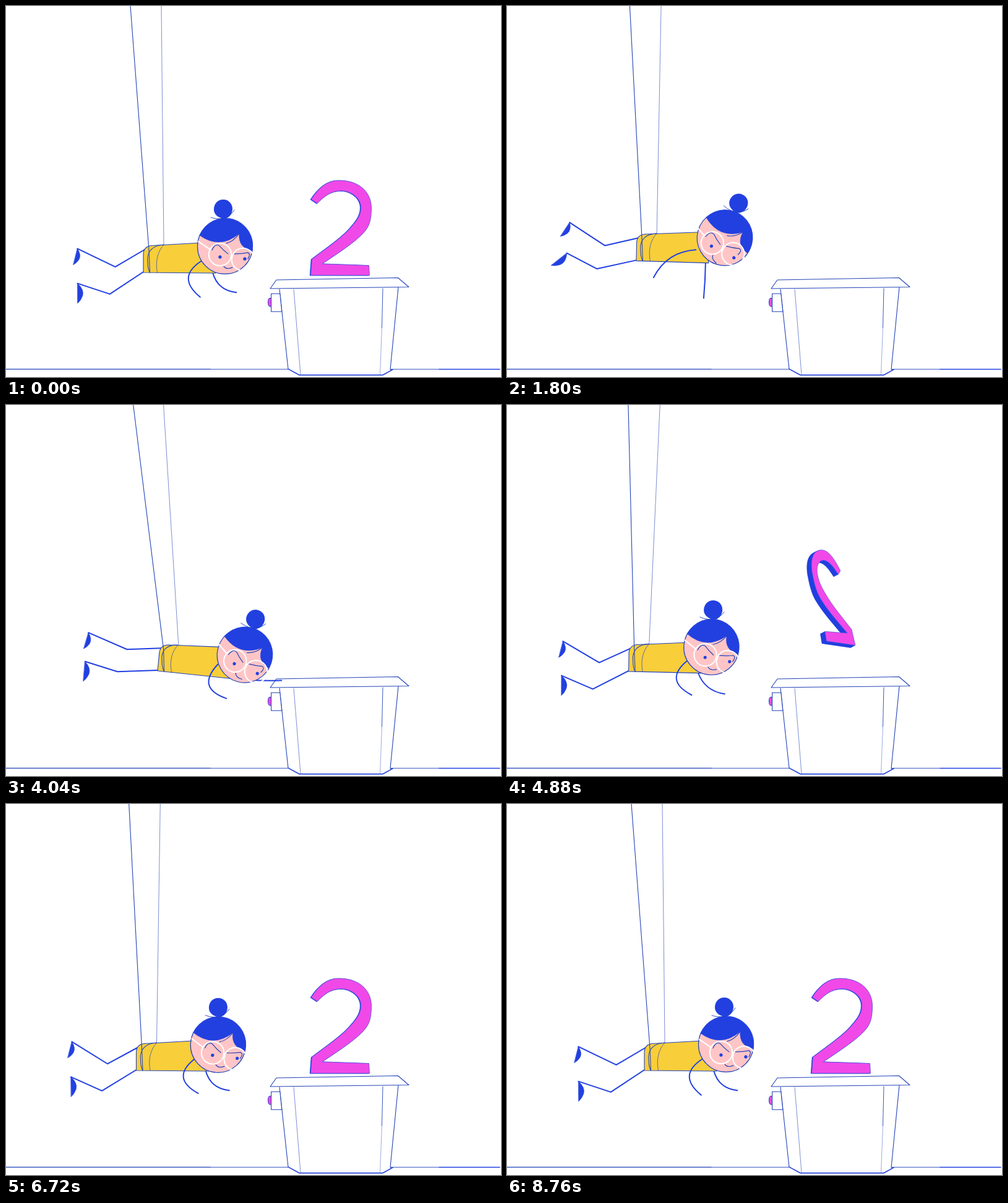
An HTML page with a canvas for the animation above (8.8 s loop, 800x600 px).

```html
<!DOCTYPE html>
<html lang="en">
<head>
<meta charset="utf-8">
<title>Swing and number</title>
<style>
html, body { margin: 0; width: 100%; height: 100%; overflow: hidden; background: #fff; }
canvas { display: block; }
</style>
</head>
<body>
<canvas id="stage" width="800" height="600"></canvas>
<script>
const ctx = document.getElementById('stage').getContext('2d');
const LOOP = 8800;
const BLUE = '#2240e0', LINE = '#2444b8', YELLOW = '#f8ce3a', SKIN = '#ffc5c6', PINK = '#f049e8';
const RAD = Math.PI / 180;
const clamp = v => Math.min(1, Math.max(0, v));

// x, y: waist. Angles in degrees: thigh falls and shin rises from level, arms turn from straight down.
const ready = { x: 222, y: 431, turn: 0, head: 0, glance: 0, thigh: 32, spread: -3, shin: 22, foot: 6,
  back: 4, front: -50, stretch: 50 };
const hover = { ...ready, x: 207.5, head: 3, thigh: 30, shin: 28, back: -4 };
const droop = { x: 200, y: 422, turn: 14, head: 55, glance: -9, thigh: 20.5, spread: 31, shin: 60, foot: 65,
  back: 34, front: 1, stretch: 67 };
const glide = { x: 194, y: 412, turn: 1, head: 15, glance: -9, thigh: 12.5, spread: 0, shin: 30, foot: 43,
  back: 57, front: 3, stretch: 58 };
const reach = { x: 245, y: 430, turn: 5.5, head: 15, glance: -4.5, thigh: 2, spread: 0, shin: 20.5, foot: 10,
  back: -14, front: -87, stretch: 89 };
const press = { ...reach, x: 233, front: -64, stretch: 87 };
const shift = (pose, dx) => ({ ...pose, x: pose.x + dx });

const timeline = [
  [0, ready], [640, shift(droop, -7)], [1040, droop], [1860, shift(glide, 15)],
  [2720, glide], [3080, shift(glide, -14)], [3760, shift(reach, -14)], [4040, reach],
  [4400, press], [5040, shift(hover, -16)], [5640, hover], [6720, shift(hover, 3)],
  [8400, ready], [LOOP, ready]
];

// Smooth curve through the poses that never overshoots them
function poseAt(t) {
  const last = timeline.length - 2;
  let k = 0;
  while (k < last && t >= timeline[k + 1][0]) k++;
  const slope = (n, part) => n < 0 || n > last ? 0 :
    (timeline[n + 1][1][part] - timeline[n][1][part]) / (timeline[n + 1][0] - timeline[n][0]);
  const tangent = (n, part) => {
    const a = slope(n - 1, part), b = slope(n, part);
    return a * b > 0 ? 2 * a * b / (a + b) : 0;
  };
  const [t0, from] = timeline[k], [t1, to] = timeline[k + 1];
  const span = t1 - t0, s = (t - t0) / span, q = 1 - s;
  const pose = {};
  for (const part in from) {
    pose[part] = from[part] * q * q * (1 + 2 * s) + to[part] * s * s * (3 - 2 * s) +
      span * s * q * (q * tangent(k, part) - s * tangent(k + 1, part));
  }
  return pose;
}

const shapes = new Map();
function draw(path, stroke, width = 1, fill) {
  if (!shapes.has(path)) shapes.set(path, new Path2D(path));
  const shape = shapes.get(path);
  if (fill) { ctx.fillStyle = fill; ctx.fill(shape); }
  if (stroke) { ctx.strokeStyle = stroke; ctx.lineWidth = width; ctx.stroke(shape); }
}
function lines(points, color, width) {
  ctx.beginPath();
  points.forEach(p => ctx.lineTo(...p));
  ctx.strokeStyle = color;
  ctx.lineWidth = width;
  ctx.stroke();
}
function disc(x, y, r, fill, line, width = 1) {
  ctx.beginPath();
  ctx.arc(x, y, r, 0, 7);
  if (fill) { ctx.fillStyle = fill; ctx.fill(); }
  if (line) { ctx.strokeStyle = line; ctx.lineWidth = width; ctx.stroke(); }
}
function at(x, y, turn, paint) {
  ctx.save();
  ctx.translate(x, y);
  ctx.rotate(turn * RAD);
  paint();
  ctx.restore();
}
// Point at a distance from p; angle 0 is right, 90 is down
const polar = ([x, y], angle, r) => [x + r * Math.cos(angle * RAD), y + r * Math.sin(angle * RAD)];

function ground() {
  draw('M0 587.4H330', LINE, 1.3);
  draw('M330 587.4H456M621 587.4H700', LINE, .9);
  draw('M700 587.4H798', BLUE, 1.5);
}

function crate(t) {
  draw('M442 458L456 587L474 597H609L625 588H621L634 455', LINE, 1.1, '#fff');
  draw('M456 587L474 596.6H609L625 588', BLUE, 1.3);
  draw('M465 458L476 596', LINE, .6);
  draw('M609 457L607.5 520', LINE, .9);
  draw('M607.5 520L604.5 596', LINE, .45);
  draw('M427 457L437 443L633.5 439.5L651 454.5Z', LINE, 1.1, '#fff');
  at(3 * clamp(1 - Math.abs(t - 4480) / 180), 0, 0, () =>
    draw('M429 472.5H426Q423.5 473 423.5 479T426 486H429Z', LINE, 1, PINK));
  draw('M445.8 494.3H428.6V465.3H442.8Z', LINE, 1.1, '#fff');
}

// Digit with its base centre at the origin
const DIGIT = 'M-47 -126Q-28 -155 -4 -155C30 -155 51 -135 51 -109C51 -90 48 -80 40 -71' +
  'C26 -55 -4 -37 -29 -21L47 -16L48 0L-48 -3L-46 -29C-18 -49 5 -64 18 -79' +
  'C29 -91 34 -99 34 -110C34 -126 17 -138 1 -138C-15 -138 -25 -131 -37 -119Z';
function solid(spin) {
  const c = Math.cos(spin * RAD), s = Math.sin(spin * RAD);
  const depth = 9 * s, steps = Math.ceil(Math.abs(depth)) || 1;
  for (let i = steps; i >= 0; i--) {
    ctx.save();
    ctx.transform(c, .22 * s, 0, 1, depth * i / steps, Math.abs(depth) * .3 * i / steps);
    draw(DIGIT, i ? BLUE : '#5457dc', .8, i ? BLUE : PINK);
    ctx.restore();
  }
}
function digit(t) {
  if (t < 1000) {
    // Tip over the right edge, land on its side, vanish
    const u = clamp((t - 80) / 620), size = clamp((1000 - t) / 100);
    at(540 + 172 * u, 360 - 120 * u + 309 * u * u, 90 * u, () => {
      ctx.scale(size, size);
      ctx.translate(0, 77);
      solid(-8);
    });
  } else if (t >= 4440) {
    // Spring out of the crate, spinning ever slower
    const s = (t - 4440) / 1000, fade = clamp(1 - s / 2.2);
    const sink = 172 * fade ** 2 * Math.cos(4.64 * s);
    const lean = 14 * fade * Math.sin(2 * Math.PI * s / .6);
    ctx.save();
    ctx.beginPath();
    ctx.rect(0, 0, 800, 448);
    ctx.clip();
    at(540, 437 + sink, lean, () => solid(490 * fade ** 3 - 8));
    ctx.restore();
  }
}

function face(glance) {
  disc(0, 0, 44.5, SKIN, LINE, 1.2);
  at(0, 0, -glance, () => {
    draw('M-41 -18A44.5 44.5 0 0 1 44 7Q21 2 23 -21Q-8 5.5 -41 -18Z', BLUE, .6, BLUE);
    draw('M2 -5Q14 -8 23 -21', LINE, 1.1);
    draw('M-3 -76C7 -76 12 -68 12 -61C12 -53 7 -46 -1 -45C-11 -46 -18 -52 -18 -60C-18 -69 -12 -76 -3 -76Z', null, 1, BLUE);
    draw('M-23 -47Q-15 -44 -3 -45M15 -59Q10 -50 0 -46', LINE, .9);
  });
  at(glance, 0, 0, () => {
    draw('M-21 6Q-16 -6 -9 -1Q-3 6 5 12M15 12Q27 12 37 10Q42 12 37 20', LINE, 1.2);
    disc(-8, 17 - glance * .15, 2.6, BLUE);
    disc(32, 20 - glance * .75, 2.6, BLUE);
    at(-1, 32, -glance * 5, () => draw('M-1 0Q3 6 13 2', LINE, 1.2));
    disc(-8, 13, 18.2, null, '#fff', 2);
    disc(29, 21, 18.2, null, '#fff', 2);
    draw('M10 17L12 18M-24 5L-43 -8', '#fff', 2);
  });
}

function leg(hip, thigh, thighSize, shin, shinSize, foot, footSize) {
  const knee = polar(hip, 180 - thigh, thighSize), ankle = polar(knee, 180 + shin, shinSize);
  lines([hip, knee, ankle], BLUE, 2);
  at(...ankle, foot, () => {
    ctx.scale(footSize, footSize);
    draw('M0 0Q11 10 8 20Q5 28 0 32Z', BLUE, .7, BLUE);
  });
}

// The arm bows more the closer the hand is to the shoulder
function arm(shoulder, angle, length, bow) {
  const hand = polar(shoulder, 90 + angle, length);
  const slack = Math.sqrt(Math.max(0, 90 ** 2 - length ** 2));
  const bend = polar(polar(shoulder, 90 + angle, length / 2), 180 + angle, bow * slack);
  ctx.beginPath();
  ctx.moveTo(...shoulder);
  ctx.quadraticCurveTo(...bend, ...hand);
  ctx.strokeStyle = BLUE;
  ctx.lineWidth = 2;
  ctx.stroke();
}

function ropes({ x, y, turn }) {
  const slant = Math.tan(turn * RAD);
  const near = [x + 9 + turn * .1, y - 36 + 9 * slant];
  const far = [x + 33 + turn * .15, y - 45 + 33 * slant];
  lines([[201 + (near[0] - 231) * .2, 0], near, [x + 10.5, y + 10 * slant]], LINE, 1.1);
  lines([[251 + (far[0] - 255) * .15, 0], far], LINE, .6);
  ctx.save();
  ctx.transform(1, slant, 0, 1, x, y);
  draw('M33 -45C16 -44 5 -35 7 -17Q7 -6 10.5 0', LINE, 1.1);
  draw('M33 -45C23 -34 19 -18 22.5 0', LINE, .7);
  ctx.restore();
}

function girl(p) {
  const onBody = (dx, dy) => polar(polar([p.x, p.y], p.turn, dx), p.turn + 90, dy);
  const cross = 3 - p.spread * .25;
  leg(onBody(2, -37), p.thigh + p.spread / 2, 55, p.shin + cross, 68, 11 + p.foot * .52, .84);
  leg(onBody(0, -1), p.thigh - p.spread / 2, 65, p.shin - cross, 55, p.foot * 1.4 - 9, 1);
  arm(onBody(112, 0), p.front, p.stretch, -.3 * Math.sin(p.front * RAD));
  at(p.x, p.y, p.turn, () =>
    draw('M0 0V-29Q0 -42 13 -43.5L111 -49L117 1Z', LINE, 1.1, YELLOW));
  ropes(p);
  arm(onBody(96, -20), p.back, 57 + 25 * clamp(p.back / 34), .63);
  const neck = polar([p.x, p.y], p.turn - 17.7 + p.head * .13, 138.5 - p.glance);
  at(...neck, p.head, () => face(p.glance));
}

const start = performance.now();
function frame() {
  const t = (performance.now() - start) % LOOP;
  ctx.fillStyle = '#fff';
  ctx.fillRect(0, 0, 800, 600);
  ctx.lineCap = ctx.lineJoin = 'round';
  ground();
  crate(t);
  digit(t);
  girl(poseAt(t));
  requestAnimationFrame(frame);
}
frame();
</script>
</body>
</html>
```
